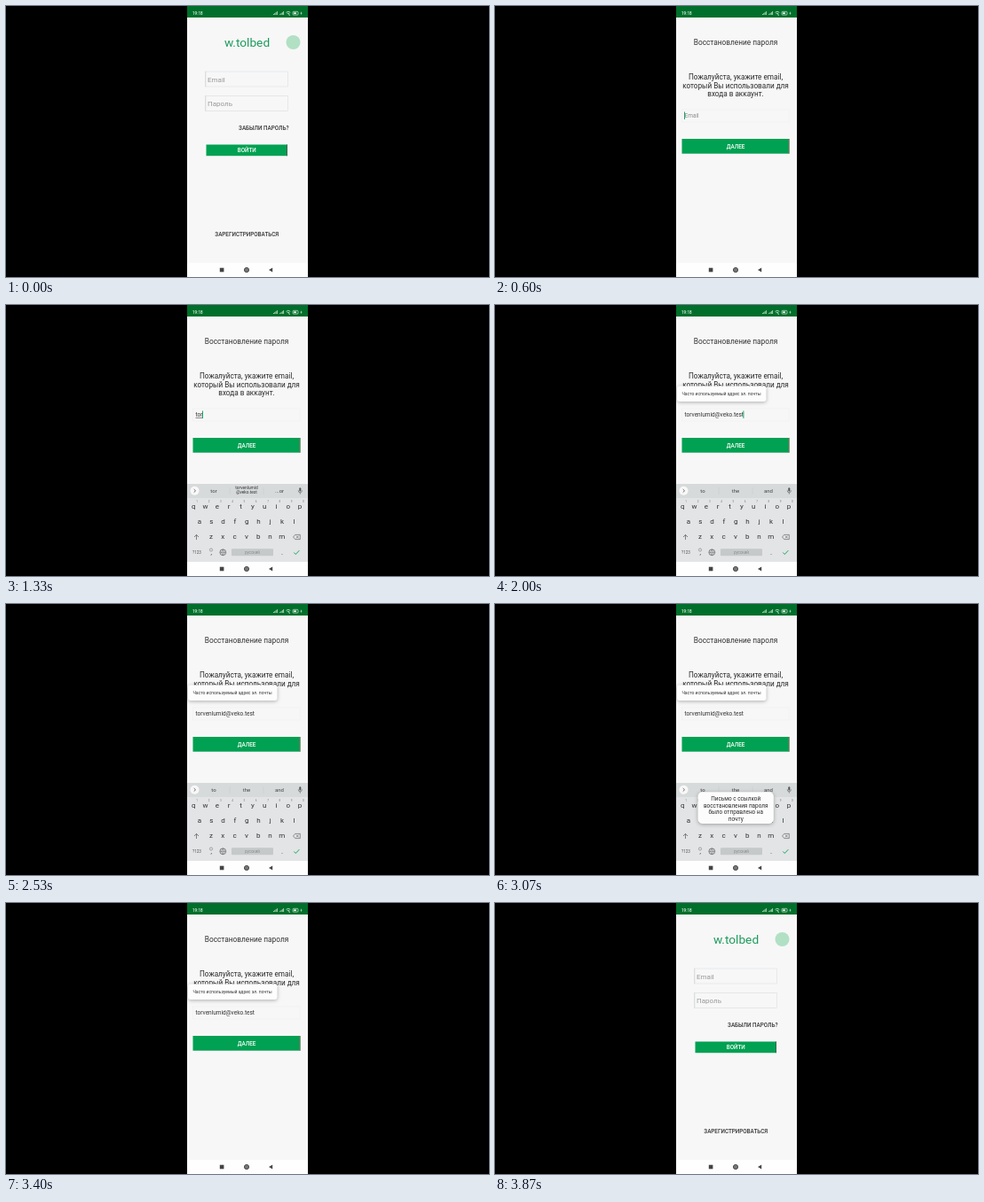
These frames come from a looping animation (544 px wide and 306 px high, 3.94 s). An HTML page:

```html
<!DOCTYPE html>
<html lang="ru">
<head>
<meta charset="utf-8">
<title>Восстановление пароля</title>
<style>
  html, body { margin: 0; width: 100%; height: 100%; overflow: hidden; background: #000; }
  svg { display: block; width: 100vw; height: 100vh; font-family: Roboto, "Noto Sans", sans-serif; }
  .card { filter: drop-shadow(0 1px 2px rgba(0, 0, 0, .3)); }
</style>
</head>
<body>
<svg id="stage" viewBox="0 0 544 306"></svg>
<script>
const LOOP = 3940;
const ADDRESS = 'torvenlumid@veko.test';
const INK = '#333', GREEN = '#00a152', PAGE = '#f7f7f8';

const text = (x, y, size, label, { fill = INK, anchor = 'middle', weight = 400, id = '' } = {}) =>
  `<text id="${id}" x="${x}" y="${y}" font-size="${size}" fill="${fill}" text-anchor="${anchor}" font-weight="${weight}">${label}</text>`;
const rect = (x, y, w, h, fill, extra = '') =>
  `<rect x="${x}" y="${y}" width="${w}" height="${h}" fill="${fill}" ${extra}/>`;
const line = (d, stroke = INK, width = .7) =>
  `<path d="${d}" fill="none" stroke="${stroke}" stroke-width="${width}"/>`;
const circle = (x, y, r, fill, extra = '') =>
  `<circle cx="${x}" cy="${y}" r="${r}" fill="${fill}" ${extra}/>`;
const lines = (x, y, size, step, rows) =>
  rows.map((row, i) => text(x, y + i * step, size, row, { fill: '#2b2b2b' })).join('');

const button = (x, y, w, h, edge, label) =>
  rect(x, y, w, h, GREEN) + rect(x + w - 1, y, 1, h, edge) +
  text(x + w / 2, y + h / 2 + 2.3, 6.3, label, { fill: '#fff', weight: 500 });

const field = (y, label) =>
  rect(224.5, y, 93, 17, PAGE, 'stroke="#e1e2e2" stroke-width=".7"') +
  line(`M224.8 ${y}v17`, '#d2d4d4') +
  text(227, y + 11.7, 8, label, { fill: '#999', anchor: 'start' });

function loginPage() {
  return text(271.5, 46, 13.7, 'w.tolbed', { fill: '#1d9b5a' }) +
    circle(323.5, 41, 8, '#b2e0c4') +
    field(74, 'Email') + field(101.5, 'Пароль') +
    text(318.5, 140.3, 6.3, 'ЗАБЫЛИ ПАРОЛЬ?', { anchor: 'end', weight: 500 }) +
    button(225.5, 156.5, 91.5, 12.7, '#43664f', 'ВОЙТИ') +
    text(271.3, 260.2, 6.3, 'ЗАРЕГИСТРИРОВАТЬСЯ', { weight: 500 });
}

function recoveryPage() {
  return text(271, 44, 8.3, 'Восстановление пароля') +
    lines(271, 82.8, 8.2, 9.7, ['Пожалуйста, укажите email,', 'который Вы использовали для', 'входа в аккаунт.']) +
    rect(210.5, 117, 120.5, 14, 'none', 'stroke="#efefef" stroke-width=".7"') +
    text(213.5, 126.3, 6.5, 'Email', { fill: '#8c8c8c', anchor: 'start', id: 'hint' }) +
    text(213.5, 126.3, 6.5, '', { anchor: 'start', id: 'typed' }) +
    rect(213.5, 127.2, 0, .6, '#444', 'id="underline"') +
    rect(213, 119.5, .9, 8.5, GREEN, 'id="caret"') +
    button(210.5, 150, 121, 16.7, '#8b6f5c', 'ДАЛЕЕ') +
    `<g id="tooltip"><g class="card">${rect(205, 91.5, 100.5, 17.5, '#fdfdfd', 'rx="3"')}</g>` +
    text(255, 102.2, 5, 'Часто используемый адрес эл. почты') + '</g>';
}

function keyboard() {
  const keyRow = (letters, x, y) =>
    [...letters].map((key, i) => text(x + i * 13.3, y, 8, key)).join('');
  const digits = [...'1234567890'].map((d, i) => text(215.2 + i * 13.3, 223.2, 3, d, { fill: '#777' })).join('');
  return rect(204, 202, 136, 88, '#e2e4e5') + rect(204, 202, 136, 16, '#d7dadb') +
    circle(212.5, 209.8, 5, '#f8f8f8') + line('M211.7 208l1.8 1.8-1.8 1.8') +
    line('M252 206v8M290 206v8', '#c4c8ca', .5) +
    [234, 271, 308].map((x, i) => text(x, 212, 6, '', { id: 'word' + i, fill: '#444' })).join('') +
    text(271, 207.5, 4.8, ADDRESS.slice(0, 11), { id: 'address0' }) +
    text(271, 213.2, 4.8, ADDRESS.slice(11), { id: 'address1' }) +
    rect(330.3, 206.3, 2, 4.2, '#555', 'rx="1"') + line('M329.2 209.3q0 2.5 2.1 2.5t2.1-2.5M331.3 211.8v1.8', '#555', .6) +
    keyRow('qwertyuiop', 211.3, 229.5) + digits +
    keyRow('asdfghjkl', 218, 246.8) + keyRow('zxcvbnm', 231, 264.3) +
    line('M214.5 265v-5.5M212 262l2.5-2.6 2.5 2.6', '#555') +
    line('M323.5 262l2.2-2.6h5.6v5.2h-5.6zM327 260.7l2.6 2.6m0-2.6l-2.6 2.6', '#555', .6) +
    text(215, 281, 4.6, '?123', { fill: '#555' }) +
    circle(231, 276.5, 1.6, 'none', 'stroke="#666" stroke-width=".5"') + text(231.2, 281.8, 7, ',') +
    circle(244.3, 279.3, 3.4, 'none', 'stroke="#555" stroke-width=".7"') +
    line('M241 279.3h6.6M244.3 275.9q-3 3.4 0 6.8q3-3.4 0-6.8', '#555', .5) +
    rect(254, 275.3, 47, 8, '#c5c9ca', 'rx="1"') + text(277.5, 280.8, 4.5, 'русский', { fill: '#8a8d8f' }) +
    text(311, 281.5, 8, '.') + line('M324.3 279.5l2 2 4-4.3', GREEN, .9);
}

function toast() {
  return `<g class="card">${rect(228.5, 212.3, 85.3, 35.7, '#fcfcfc', 'rx="5"')}</g>` +
    lines(271.2, 222, 6.4, 7.5, ['Письмо с ссылкой', 'восстановления пароля', 'было отправлено на', 'почту']);
}

function statusBar() {
  const bars = x => line(`M${x} 10v-1m1.3 1v-2m1.3 2v-3m1.3 3v-4`, '#cfe6d6', .8);
  return rect(204, 0, 136, 13, '#006f2b') +
    text(210, 10, 4.6, '19:18', { fill: '#e4f2e8', anchor: 'start', weight: 500 }) +
    bars(301.5) + bars(308.7) +
    line('M315.5 7.3q2.4-2 4.8 0M316.5 8.8q1.4-1 2.8 0M318 9.5l2 1', '#d9ecdf', .8) +
    rect(323, 6.3, 6, 3.7, 'none', 'rx=".8" stroke="#d9ecdf" stroke-width=".7"') +
    rect(324, 7.3, 3, 1.7, '#d9ecdf') + line('M332.5 6.7v3m-1-1.5h2', '#d9ecdf', .6);
}

function navBar() {
  return rect(204, 290, 136, 16, '#fefefe') + rect(240.8, 295.7, 4.6, 4.6, '#444') +
    circle(271, 298, 2.6, '#777', 'stroke="#444" stroke-width=".9"') +
    '<path d="M296 298l4.2-2.6v5.2z" fill="#444"/>';
}

const stage = document.getElementById('stage');
stage.innerHTML =
  '<clipPath id="screen"><rect x="204" y="0" width="136" height="290"/></clipPath>' +
  rect(0, 0, 544, 306, '#000') + rect(204, 0, 136, 306, PAGE) +
  `<g clip-path="url(#screen)"><g id="login">${loginPage()}</g><g id="recovery">${recoveryPage()}</g>` +
  `<g id="keyboard">${keyboard()}</g><g id="toast">${toast()}</g></g>` +
  statusBar() + navBar();

const $ = id => document.getElementById(id);

// Each entry: time, text in the field, three suggestions
const TYPING = [
  [0, '', ['to', 'the', 'and']],
  [1000, 't', ['t', 'the', 'to']],
  [1130, 'to', ['to', 'too', 'top']],
  [1270, 'tor', ['tor', '', '...or']],
  [1665, ADDRESS, ['to', 'the', 'and']],
];
const CARET = [[560, 1035], [1000, 2130], [2565, 3000]];

const ease = p => p * p * (3 - 2 * p);
const ramp = (t, start, end) => ease(Math.min(1, Math.max(0, (t - start) / (end - start))));
const pulse = (t, inStart, inEnd, outStart, outEnd) => ramp(t, inStart, inEnd) - ramp(t, outStart, outEnd);
const fade = (id, value) => $(id).setAttribute('opacity', value);

function render(t) {
  const recovery = pulse(t, 260, 400, 3530, 3670);
  fade('recovery', recovery);
  fade('login', 1 - recovery);
  fade('tooltip', pulse(t, 1730, 1860, 3530, 3600));
  fade('toast', pulse(t, 2530, 2670, 3270, 3380));

  const shown = pulse(t, 610, 730, 3270, 3395);
  $('keyboard').setAttribute('transform', `translate(0 ${88 * (1 - shown)})`);

  const [, typed, words] = TYPING.findLast(step => t >= step[0]);
  $('typed').textContent = typed;
  const width = typed ? $('typed').getComputedTextLength() : 0;
  fade('hint', typed ? 0 : 1);
  $('underline').setAttribute('width', typed === ADDRESS ? 0 : width);
  $('caret').setAttribute('x', 213 + width);
  fade('caret', CARET.some(([on, off]) => t >= on && t < off) ? 1 : 0);

  words.forEach((word, i) => $('word' + i).textContent = word);
  const offered = words[1] ? 0 : 1;
  fade('address0', offered);
  fade('address1', offered);
}

const start = performance.now();
function tick() {
  render((performance.now() - start) % LOOP);
  requestAnimationFrame(tick);
}
tick();
</script>
</body>
</html>
```
